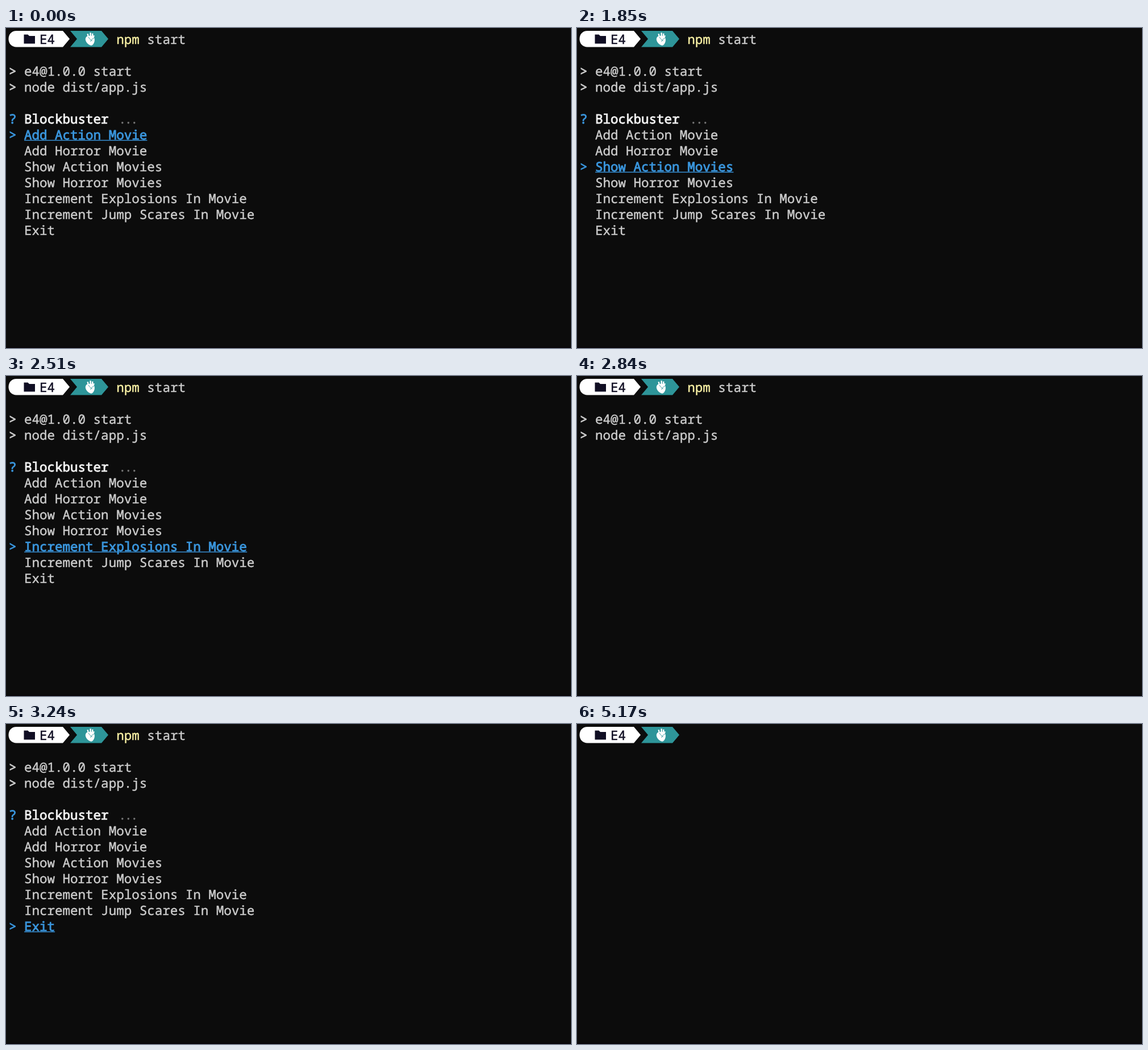
Recreate the animation shown at these times as an HTML page. Size 994 by 563 pixels, loop 5.24 s.

```html
<!DOCTYPE html>
<html lang="en">
<head>
<meta charset="utf-8">
<title>Terminal menu</title>
<style>
  html, body { margin: 0; width: 100%; height: 100%; overflow: hidden; background: #0c0c0c; }
  svg { display: block; width: 994px; height: 563px; }
  text {
    font: 22.53px "Noto Sans Mono", "DejaVu Sans Mono", monospace;
    fill: currentColor;
    stroke: currentColor;
    stroke-width: 0.45px;
    text-rendering: geometricPrecision;
    white-space: pre;
  }
  .strong { stroke-width: 0.9px; }
</style>
</head>
<body>
<svg id="stage" viewBox="0 0 994 563" xmlns="http://www.w3.org/2000/svg">
  <rect width="994" height="563" fill="#0c0c0c"/>
  <rect y="561" width="994" height="2" fill="#080509"/>
  <g id="prompt">
    <path d="M18.5 5H100L112 19.2L100 33.4H18.5C9.5 33.4 4.5 27 4.5 19.2S9.5 5 18.5 5Z" fill="#fff"/>
    <path d="M113 5H168L180 19.2L168 33.4H113L125 19.2Z" fill="#2e9599"/>
    <path d="M31.5 11.5H38.5L41 14H51V27.5H31.5Z" fill="#100e23"/>
    <path d="M145.2 17L143.6 10.2M148.6 16V8.2M151.4 17L152.4 9.6M153.4 18L154.6 13" fill="none" stroke="#fff" stroke-width="2.4"/>
    <path d="M143 14.5C146 13.2 151 13.4 153.8 15.5C156.6 18 156.4 23 154.6 26.5C153.4 29 151.6 31 149.6 30.8C145.5 30 140.4 25.5 139.8 20.5C139.5 17.5 141 15.2 143 14.5Z" fill="#fff"/>
    <path d="M145.2 15.8C146.2 18.8 149 21 151.8 22.6M154.8 17.5C151.5 19.2 149.6 21.4 148.6 24" fill="none" stroke="#2e9599" stroke-width="0.9"/>
  </g>
  <g id="output"></g>
  <g id="menu"></g>
  <rect id="cursor" x="194" y="5" width="1" height="28" fill="#fff"/>
</svg>
<script>
const CELL = 13.52, ROW = 28, LEFT = 5, BASE = 28;
const BLUE = "#3a96dd", GREY = "#cccccc";
const LOOP = 5240;
const FIRST_ITEM = 6;
const ITEMS = [
  "Add Action Movie", "Add Horror Movie", "Show Action Movies", "Show Horror Movies",
  "Increment Explosions In Movie", "Increment Jump Scares In Movie", "Exit"
];

// Each step holds until the next one starts; select -1 means a blank menu.
const STEPS = [
  { at: 0, select: 0 },
  { at: 1450, select: 1 },
  { at: 1850, select: 2 },
  { at: 2180, select: -1 },
  { at: 2240, select: 3 },
  { at: 2510, select: 4 },
  { at: 2840, select: -1 },
  { at: 2910, select: 5 },
  { at: 3240, select: 6 },
  { at: 3840, cleared: true, cursor: true },
  { at: 4440, cleared: true },
  { at: 4970, cleared: true, cursor: true },
  { at: 5170, cleared: true }
];

const $ = id => document.getElementById(id);
const colX = col => LEFT + col * CELL;
const baseline = row => BASE + row * ROW;

function add(parent, tag, attrs, content = "") {
  const node = document.createElementNS("http://www.w3.org/2000/svg", tag);
  for (const key in attrs) node.setAttribute(key, attrs[key]);
  node.textContent = content;
  parent.appendChild(node);
  return node;
}

function write(parent, col, row, content, color = GREY, strong = false) {
  const node = add(parent, "text", { x: colX(col), y: baseline(row) }, content);
  paint(node, color, strong);
  return node;
}

function paint(node, color, strong) {
  node.style.color = color;
  node.classList.toggle("strong", strong);
}

function show(node, visible) {
  node.setAttribute("visibility", visible ? "inherit" : "hidden");
}

const output = $("output"), menu = $("menu"), cursor = $("cursor");

write($("prompt"), 4, 0, "E4", "#100e23");
write(output, 14, 0, "npm", "#f9f1a5");
write(output, 18, 0, "start");
["e4@1.0.0 start", "node dist/app.js"].forEach((line, i) => {
  write(output, 0, i + 2, ">", GREY, true);
  write(output, 2, i + 2, line);
});

write(menu, 0, 5, "?", BLUE, true);
write(menu, 2, 5, "Blockbuster", "#f2f2f2", true);
const dots = write(menu, 14, 5, "...", "#767676");
dots.setAttribute("dx", 3.8);
dots.setAttribute("letter-spacing", -3);

const labels = ITEMS.map((item, i) => write(menu, 2, FIRST_ITEM + i, item));
const pointer = write(menu, 0, FIRST_ITEM, ">", BLUE, true);
const underline = add(menu, "rect", { x: colX(2), height: 1.4, fill: BLUE });

function draw(time) {
  const step = STEPS.findLast(s => s.at <= time % LOOP);
  const menuShown = !step.cleared && step.select >= 0;
  show(output, !step.cleared);
  show(menu, menuShown);
  show(cursor, step.cursor);
  if (!menuShown) return;

  const y = baseline(FIRST_ITEM + step.select);
  labels.forEach((label, i) => {
    const selected = i === step.select;
    paint(label, selected ? BLUE : GREY, selected);
  });
  pointer.setAttribute("y", y);
  underline.setAttribute("y", y + 0.9);
  underline.setAttribute("width", ITEMS[step.select].length * CELL);
}

const start = performance.now();
function tick() {
  draw(performance.now() - start);
  requestAnimationFrame(tick);
}
tick();
</script>
</body>
</html>
```
